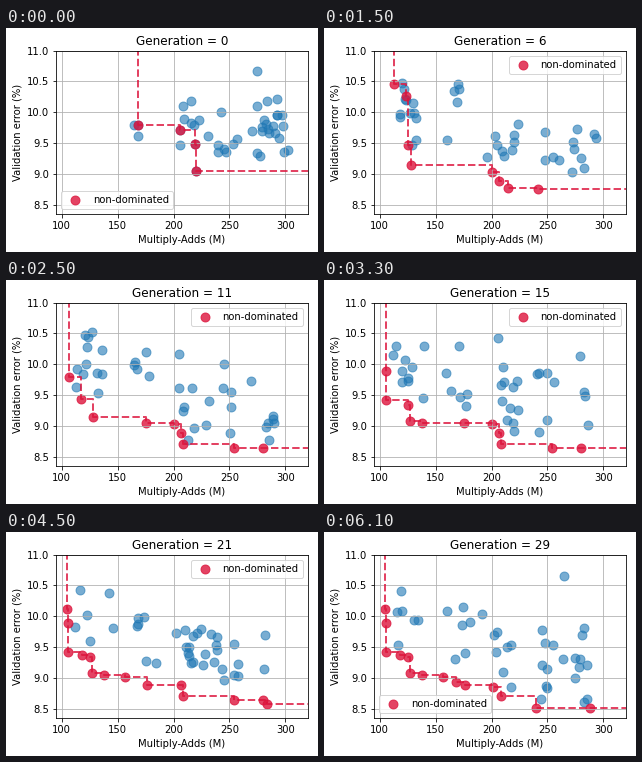
A matplotlib script for the animation above (6.6 s loop, 312 px wide and 224 px high).

```python
import numpy as np
import matplotlib.pyplot as plt
from matplotlib.animation import FuncAnimation

W, H, DPI = 312, 224, 72
LEFT, TOP, WIDTH, HEIGHT = 50.2, 22.62, 251.45, 163.2
LAST = 29
XLIM, YLIM = (95, 320), (8.35, 11)

# Milestones of the search: generation, multiply-adds, error
FOUND = np.array([
    (0, 168.2, 9.797), (0, 205.7, 9.715), (0, 219.1, 9.488), (0, 220, 9.049),
    (1, 241.4, 8.756), (2, 214.6, 8.772), (3, 123.6, 10.27), (3, 200.8, 9.03),
    (4, 125.4, 9.47), (4, 206.6, 8.884), (5, 112.9, 10.46), (6, 128, 9.146),
    (8, 253.9, 8.642), (9, 106.6, 9.797), (9, 208.4, 8.707), (10, 117.3, 9.44),
    (10, 175.4, 9.045), (11, 279.8, 8.638), (12, 105.5, 9.894),
    (13, 105.8, 9.42), (13, 137.9, 9.049), (14, 125.4, 9.34),
    (15, 127.1, 9.08), (16, 118.2, 9.374), (16, 283.4, 8.577),
    (17, 156.9, 9.01), (18, 176.3, 8.89), (20, 104.8, 10.12),
    (22, 168.2, 8.935), (24, 239.6, 8.512), (28, 201.3, 8.854),
    (29, 287.9, 8.508)])

# Candidates gather around a few model sizes and drift to smaller ones
SIZES = [125, 170, 213, 247, 284]
EARLY = np.array([0, 0.05, 0.25, 0.25, 0.45])
LATE = np.array([0.22, 0.15, 0.27, 0.23, 0.13])
OUTLIERS = (0, 3, 9, 13, LAST)


def pareto(gen):
    pts = FOUND[FOUND[:, 0] <= gen, 1:]
    pts = pts[np.argsort(pts[:, 0])]
    best = np.minimum.accumulate(pts[:, 1])
    return pts[np.r_[True, pts[1:, 1] < best[:-1]]]


def population(gen, front, n=38):
    rng = np.random.default_rng(100 + gen)
    weights = LATE + (EARLY - LATE) * np.exp(-gen / 4)
    x = rng.normal(rng.choice(SIZES, n, p=weights), 8).clip(112, 306)
    step = np.searchsorted(front[:, 0], x) - 1
    floor = np.where(step < 0, 9.3, front[step, 1]).clip(max=9.3)
    pts = np.c_[x, floor + 0.05 + 1.5 * rng.beta(2, 2.5, n)]
    if gen == 0:
        pts = np.vstack([pts, front])
    if gen in OUTLIERS:
        pts = np.vstack([pts, rng.uniform((240, 10.62), (285, 10.9))])
    return pts


def staircase(front):
    x, y = front.T
    return np.r_[np.repeat(x, 2), XLIM[1] + 10], np.r_[12, np.repeat(y, 2)]


fig = plt.figure(figsize=(W / DPI, H / DPI), dpi=DPI)
ax = fig.add_axes([LEFT / W, 1 - (TOP + HEIGHT) / H, WIDTH / W, HEIGHT / H])
ax.set(xlim=XLIM, ylim=YLIM, xlabel="Multiply-Adds (M)",
       ylabel="Validation error (%)")
ax.grid(True)
title = ax.set_title("")
crowd_dots = ax.scatter([], [], s=80, color="C0", alpha=0.6)
front_dots = ax.scatter([], [], s=80, color="crimson", alpha=0.8,
                        label="non-dominated")
line, = ax.plot([], [], "--", color="crimson", lw=2, alpha=0.8)
legend = ax.legend(loc="upper right")


def draw(tick):
    # The first and last generation hold for five ticks, the others for two
    gen = int(np.clip((tick - 3) // 2, 0, LAST))
    front = pareto(gen)
    pts = population(gen, front)
    title.set_text(f"Generation = {gen}")
    crowd_dots.set_offsets(pts)
    front_dots.set_offsets(front)
    line.set_data(*staircase(front))
    # The legend steps aside when a dot is in its corner
    covered = np.any((pts[:, 0] > 215) & (pts[:, 1] > 10.6))
    legend.set_loc("lower left" if covered else "upper right")
    return crowd_dots, front_dots, line, title, legend


anim = FuncAnimation(fig, draw, frames=66, interval=100, repeat=True,
                     repeat_delay=0)
plt.show()
```
